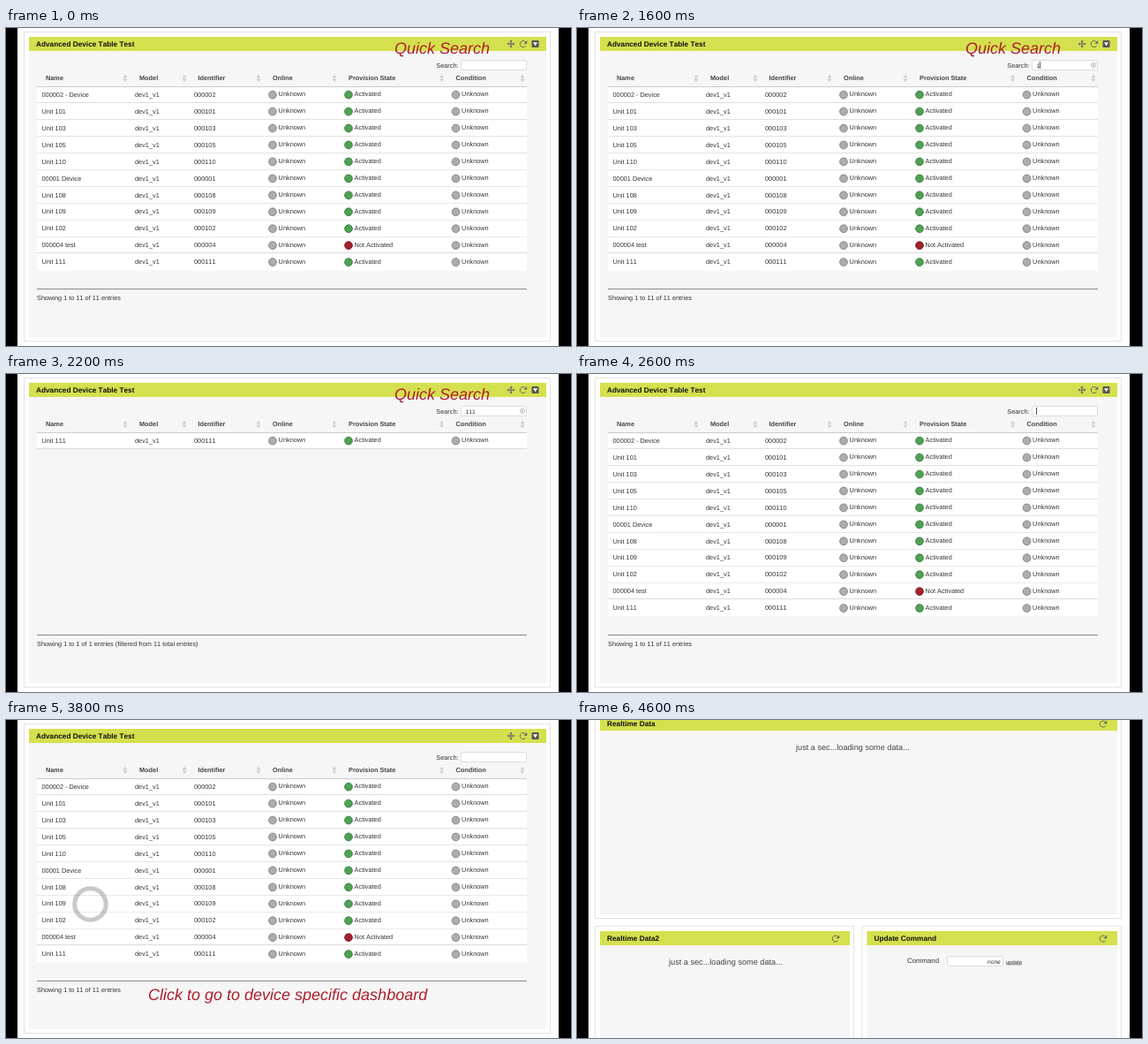
Recreate the animation shown at these times as an HTML page. Size 640 px wide and 360 px high, loop 4.8 s.

```html
<!DOCTYPE html>
<html lang="en">
<head>
<meta charset="utf-8">
<title>Device table</title>
<style>
  html, body { margin: 0; width: 100%; height: 100%; overflow: hidden; background: #fff; }
  svg { display: block; width: 640px; height: 360px; }
  text {
    font: 7.33px "Liberation Sans", Arial, sans-serif;
    font-kerning: none;
    text-rendering: geometricPrecision;
    white-space: pre;
    fill: #333;
  }
  .title { font-size: 8.25px; font-weight: bold; fill: #111; }
  .head { font-weight: bold; fill: #444; }
  .note { font-size: 18px; font-style: italic; fill: #ac1f2b; }
  .wait { font-size: 9.17px; fill: #444; }
  .input { font-size: 6.67px; }
  .link { font-size: 5.9px; text-decoration: underline; }
</style>
</head>
<body>
<svg id="stage" viewBox="0 0 640 360"></svg>
<script>
const LOOP = 4800, STEP = 200;
const ROW_TOP = 66, ROW_H = 18.95;
const names = ['000002 - Device', 'Unit 101', 'Unit 103', 'Unit 105', 'Unit 110', '00001 Device',
  'Unit 108', 'Unit 109', 'Unit 102', '000004 test', 'Unit 111'];
const devices = names.map(name => ({
  name,
  id: name.startsWith('Unit') ? '000' + name.slice(5) : name === '00001 Device' ? '000001' : name.slice(0, 6),
  active: name !== '000004 test'
}));
const columns = [['Name', 45, 135], ['Model', 151, 202], ['Identifier', 217.5, 286],
  ['Online', 302, 372], ['Provision State', 388, 493.5], ['Condition', 509.5, 585]];
const GRAY = ['#adadad', '#777'], GREEN = ['#4fa253', '#2f7038'], RED = ['#a3212d', '#74161f'];

const text = (x, y, s, cls = '', more = '') => `<text x="${x}" y="${y}" class="${cls}" ${more}>${s}</text>`;
const rect = (x, y, w, h, fill, more = '') =>
  `<rect x="${x}" y="${y}" width="${w}" height="${h}" fill="${fill}" ${more}/>`;
const path = (d, fill, more = '') => `<path d="${d}" fill="${fill}" ${more}/>`;
const hline = (y, color) => rect(35, y, 555, 1, color);
const field = (x, y, w, h) => rect(x + .5, y + .5, w - 1, h - 1, '#fff', 'stroke="#ddd" rx="1.5"');

const refresh = (x, y) =>
  path(`M${x + 2.6} ${y + 2.2}A3.5 3.5 0 1 1 ${x + 2.6} ${y - 2}`, 'none', 'stroke="#666"') +
  path(`M${x + 4.2} ${y - 4}v3.8h-3.8z`, '#666');

function panel(x, y, w, h, title) {
  return rect(x + .5, y + .5, w - 1, h - 1, '#fff', 'stroke="#e3e3e3"') +
    rect(x + 6, y + 6, w - 11, h - 11, '#f6f6f6') +
    rect(x + 6, y + 6, w - 11, 16, '#d5e04e') +
    text(x + 14, y + 16.8, title, 'title');
}

function badge(x, y, [fill, stroke], label) {
  return `<circle cx="${x}" cy="${y + 9.6}" r="4.4" fill="${fill}" stroke="${stroke}" stroke-width=".8"/>` +
    text(x + 6.6, y + 11.3, label);
}

function row(d, i, last, hover) {
  const y = ROW_TOP + i * ROW_H, base = y + 11.8;
  return rect(35, y, 555, ROW_H, hover ? '#f5f5f5' : '#fff') +
    (last && i ? '' : hline(Math.round(y + ROW_H - 1), '#ddd')) +
    text(40.5, base, d.name) + text(146, base, 'dev1_v1') + text(213, base, d.id) +
    badge(302, y, GRAY, 'Unknown') +
    badge(388, y, d.active ? GREEN : RED, d.active ? 'Activated' : 'Not Activated') +
    badge(509.5, y, GRAY, 'Unknown');
}

function searchBox(t, query) {
  const caret = (t >= 1400 && t < 2200) || (t >= 2400 && t < 3000);
  let s = text(487.3, 45, 'Search:') + field(515, 36, 75, 12) + text(520.5, 44.8, query, 'input');
  if (caret) s += rect(520.2 + query.length * 3.71, 38, .8, 8, '#222');
  if (query) {
    s += '<circle cx="585" cy="42" r="2.6" fill="#fff" stroke="#aaa" stroke-width=".8"/>' +
      path('M584 41l2 2m0-2l-2 2', 'none', 'stroke="#aaa" stroke-width=".7"');
  }
  return s;
}

const tools = () =>
  path('M572 14.5v7M568.5 18h7', 'none', 'stroke="#666" stroke-width="1.2"') +
  path('M572 13.6l1.7 2h-3.4zM572 22.4l1.7-2h-3.4zM567.6 18l2-1.7v3.4zM576.4 18l-2-1.7v3.4z', '#666') +
  refresh(586, 18) +
  rect(595.5, 14, 8, 8, '#555', 'rx="1"') + path('M597 16.3h5l-2.5 4z', '#fff');

// Click ring: grows at a steady rate while it fades
function ring(t, start, x, y) {
  const r = .0288 * (t - start), w = Math.max(1, r / 4);
  const alpha = .55 - .48 * (t - start) / 1000;
  return `<circle cx="${x}" cy="${y}" r="${r - w / 2}" fill="none" stroke="#000" ` +
    `stroke-width="${w}" stroke-opacity="${alpha}"/>`;
}

function tableView(t) {
  const query = t < 1600 ? '' : t < 1800 ? '1' : t < 2000 ? '11' : t < 2400 ? '111' : t < 2600 ? '1' : '';
  const found = devices.filter(d => `${d.name} dev1_v1 ${d.id}`.includes(query));
  const n = found.length, all = devices.length;
  const hovering = t >= 3000 && t < 3600;
  let s = panel(20, 4, 597, 351, 'Advanced Device Table Test') + tools() + searchBox(t, query);
  for (const [label, x, sort] of columns) {
    s += text(x, 59.2, label, 'head') +
      path(`M${sort - 2.5} 56.3l2.5-3.5 2.5 3.5zM${sort - 2.5} 57.5l2.5 3.5 2.5-3.5z`, '#ccc');
  }
  s += found.map((d, i) => row(d, i, i === n - 1, hovering && d.name === 'Unit 109')).join('');
  s += hline(ROW_TOP, '#ccc') + hline(295, '#8a8a8a');
  s += text(35, 308, `Showing 1 to ${n} of ${n} entries` + (n < all ? ` (filtered from ${all} total entries)` : ''));
  if (t < 2600) s += text(440, 29, 'Quick Search', 'note');
  if (t >= 400 && t < 1400) s += ring(t, 348, 543.5, 41.8);
  if (t >= 3200) s += ring(t, 3096, 95.5, 208.5);
  return s;
}

function dashboardView(t) {
  const wait = 'just a sec...loading some data...';
  let s = panel(20, -10, 597, 235, 'Realtime Data') + refresh(596, 4.5) +
    panel(20, 233, 294, 140, 'Realtime Data2') + refresh(293, 247.5) +
    panel(322.5, 233, 294.5, 140, 'Update Command') + refresh(596, 247.5);
  if (t >= 4400) {
    s += text(248, 33.6, wait, 'wait') + text(104, 276.6, wait, 'wait') +
      text(374, 275.2, 'Command', '', 'style="font-size:7.8px"') + field(419, 267, 64, 12) +
      text(465, 275.6, 'none', 'input') + text(486, 275.6, 'update', 'link');
  }
  return s;
}

function scene(t) {
  return rect(0, 0, 640, 360, '#fff') +
    (t < 4000 ? tableView(t) : dashboardView(t)) +
    (t >= 3200 && t < 4600 ? text(161, 317, 'Click to go to device specific dashboard', 'note') : '') +
    rect(0, 0, 13, 360, '#000') + rect(626, 0, 14, 360, '#000');
}

const stage = document.getElementById('stage');
const begin = performance.now();
let shown = -1;
function frame() {
  const t = Math.floor((performance.now() - begin) % LOOP / STEP) * STEP;
  if (t !== shown) stage.innerHTML = scene(shown = t);
  requestAnimationFrame(frame);
}
frame();
</script>
</body>
</html>
```
